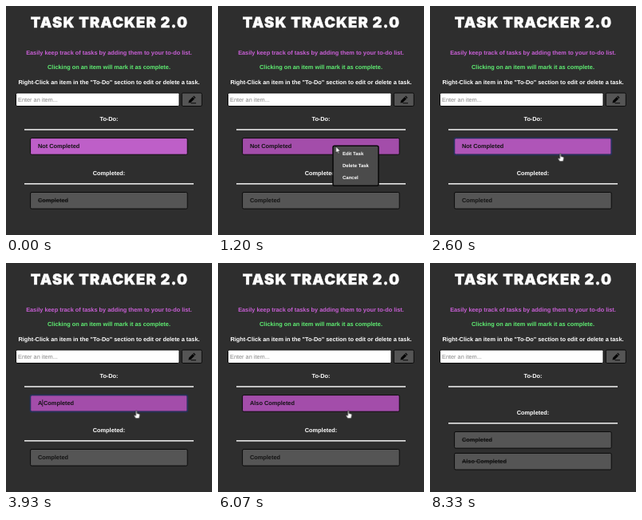
Animation, 258 px wide and 287 px high, one loop 9.74 s. Source, as an HTML page:

```html
<!DOCTYPE html>
<html lang="en">
<head>
<meta charset="utf-8">
<title>Task Tracker</title>
<style>
  html, body { margin: 0; width: 100%; height: 100%; overflow: hidden; background: #2e2e2e; }
  svg { display: block; width: 258px; height: 287px; }
  text { font: bold 7.35px "Liberation Sans", Arial, sans-serif; fill: #fff; text-rendering: geometricPrecision; white-space: pre; }
  .mid { text-anchor: middle; }
  .title { font: 900 18.4px Inter, "Arial Black", sans-serif; letter-spacing: 1.1px; stroke: #fff; stroke-width: .4; }
  .hint { font-weight: normal; fill: #858585; }
  .menu text { font-size: 6px; }
  .rule { fill: #f4f4f4; }
  .box { stroke: #0b0b0b; stroke-width: 1; }
  .grey { fill: #555; }
  .item { fill: #111; }
  .old { fill: #131313; }
  .strike { stroke: #131313; stroke-width: .7; }

  .todo, .hover, .focus, .menu, .done, .added, .first, .cursor, .arrow, .hand {
    animation: 9740ms linear infinite;
  }
  .todo { animation-name: todo; }
  .hover { animation-name: hover; }
  .focus { animation-name: focus; }
  .menu { animation-name: menu; }
  .done { animation-name: done; }
  .added { animation-name: added; }
  .first { animation-name: first; }
  .cursor { animation-name: travel; }
  .arrow { animation-name: arrow; }
  .hand { animation-name: hand; }

  @keyframes todo {
    0%, 71.86% { opacity: 1; }
    71.87%, 100% { opacity: 0; }
  }
  @keyframes hover {
    0%, 7.2% { fill: #be5fc8; }
    9.5%, 13.35% { fill: #a34daa; }
    16%, 20.4% { fill: #be5fc8; }
    32%, 100% { fill: #a34daa; }
  }
  @keyframes focus {
    0%, 19.81% { opacity: 0; }
    19.82%, 51.33% { opacity: 1; }
    51.34%, 100% { opacity: 0; }
  }
  @keyframes menu {
    0%, 10.98% { opacity: 0; }
    10.99%, 19.81% { opacity: 1; }
    19.82%, 100% { opacity: 0; }
  }
  @keyframes done {
    0%, 71.86% { transform: translateY(0); }
    71.87%, 100% { transform: translateY(-22px); }
  }
  @keyframes added {
    0%, 71.86% { opacity: 0; }
    71.87%, 100% { opacity: 1; }
  }
  @keyframes first {
    0%, 10.26% { opacity: 1; }
    10.27%, 71.86% { opacity: 0; }
    71.87%, 100% { opacity: 1; }
  }
  @keyframes travel {
    0%, 2.5% { transform: translate(262px, 112px); animation-timing-function: ease-out; }
    8.21%, 11% { transform: translate(144px, 175px); }
    12%, 13.2% { transform: translate(147.6px, 176px); animation-timing-function: ease-in-out; }
    16.43%, 64.37% { transform: translate(163.3px, 185.2px); }
    66.43%, 77.5% { transform: translate(156px, 179px); animation-timing-function: ease-in; }
    82.14%, 100% { transform: translate(262px, 88px); }
  }
  @keyframes arrow {
    0%, 6.5% { opacity: 1; }
    6.51%, 10.98% { opacity: 0; }
    10.99%, 15.5% { opacity: 1; }
    15.51%, 71.86% { opacity: 0; }
    71.87%, 100% { opacity: 1; }
  }
  @keyframes hand {
    0%, 6.5% { opacity: 0; }
    6.51%, 10.98% { opacity: 1; }
    10.99%, 15.5% { opacity: 0; }
    15.51%, 71.86% { opacity: 1; }
    71.87%, 100% { opacity: 0; }
  }
</style>
</head>
<body>
<svg viewBox="0 0 258 287">
  <rect width="258" height="287" fill="#2e2e2e"/>
  <text class="mid title" x="129.5" y="27">TASK TRACKER 2.0</text>
  <text class="mid" x="129" y="60.8" style="fill:#c95fd6">Easily keep track of tasks by adding them to your to-do list.</text>
  <text class="mid" x="129" y="79.3" style="fill:#5fef73">Clicking on an item will mark it as complete.</text>
  <text class="mid" x="129" y="97.8">Right-Click an item in the "To-Do" section to edit or delete a task.</text>

  <rect class="box" x="12.5" y="109" width="204.5" height="16.5" rx="1.5" fill="#fff"/>
  <text class="hint" x="15" y="119.7">Enter an item...</text>
  <rect class="box grey" x="220.3" y="109" width="25" height="16.5" rx="1.5"/>
  <g transform="translate(228.5 121.6) rotate(-45)">
    <path d="M0 0L2.5-1.7H9.2V1.7H2.5ZM9.9-1.7H11.2V1.7H9.9Z" fill="#050505"/>
  </g>
  <path d="M231.5 121.8H238" stroke="#050505"/>

  <text class="mid" x="129" y="143.5">To-Do:</text>
  <rect class="rule" x="23" y="154.2" width="212" height="1.5"/>

  <g class="todo">
    <rect class="box hover" x="30.6" y="165.6" width="196.6" height="20.6" rx="1.5"/>
    <rect class="focus" x="30.4" y="165.4" width="197" height="21" rx="2" fill="none" stroke="#25335c" stroke-width="1.5"/>
    <text class="item" id="task" x="40" y="178.2">Not Completed</text>
    <rect id="caret" y="171.2" width=".8" height="8.8" fill="#111" visibility="hidden"/>
  </g>

  <g class="done">
    <text class="mid" x="129" y="211.5">Completed:</text>
    <rect class="rule" x="23" y="222.1" width="212" height="1.5"/>
    <rect class="box grey" x="30.6" y="233.5" width="196.6" height="20.6" rx="1.5"/>
    <text class="old" x="40" y="246.1">Completed</text>
    <path class="strike first" d="M40 243.8h38"/>
    <g class="added">
      <rect class="box grey" x="30.6" y="260.4" width="196.6" height="20.6" rx="1.5"/>
      <text class="old" x="40" y="273">Also Completed</text>
      <path class="strike" d="M40 270.7h56"/>
    </g>
  </g>

  <g class="menu">
    <rect x="144" y="175.2" width="57" height="50" rx="2" fill="#4b4b4b" stroke="#080808" stroke-width="1.5"/>
    <text x="156" y="187.3">Edit Task</text>
    <text x="156" y="202.3">Delete Task</text>
    <text x="156" y="217.3">Cancel</text>
  </g>

  <g class="cursor" stroke="#111" stroke-width=".6" fill="#fff" stroke-linejoin="round">
    <path class="arrow" d="M0 0V8L1.8 6.4 3 9.2 4.3 8.6 3.1 5.9H5.6Z"/>
    <path class="hand" d="M-.8 0Q0-1 .8 0V3.2L3.6 3.9Q4.5 4.2 4.4 5.2L3.6 9.5H-.9L-3 6.2Q-3.2 5-2.2 5.2L-.8 6.2Z"/>
  </g>
</svg>
<script>
  const LOOP = 9740, SIZE = 7.35, BLINK = 500;
  const task = document.getElementById("task");
  const caret = document.getElementById("caret");
  // [time, text, caret offset in em]
  const edits = [
    [0, "Not Completed", 0],
    [1930, "Not Completed", 0],
    [3400, "ot Completed", 0],
    [3550, "t Completed", 0],
    [3700, " Completed", 0],
    [3870, "A Completed", .722],
    [4070, "Al Completed", 1],
    [4170, "Als Completed", 1.556],
    [4300, "Also Completed", 2.167]
  ];

  function draw() {
    const t = performance.now() % LOOP;
    const [start, words, offset] = edits.findLast(e => e[0] <= t);
    const editing = t >= 1930 && t < 5000;
    const on = Math.floor((t - start) / BLINK) % 2 === 0;
    if (task.textContent !== words) task.textContent = words;
    caret.setAttribute("x", 40.1 + offset * SIZE);
    caret.setAttribute("visibility", editing && on ? "inherit" : "hidden");
    requestAnimationFrame(draw);
  }
  draw();
</script>
</body>
</html>
```
